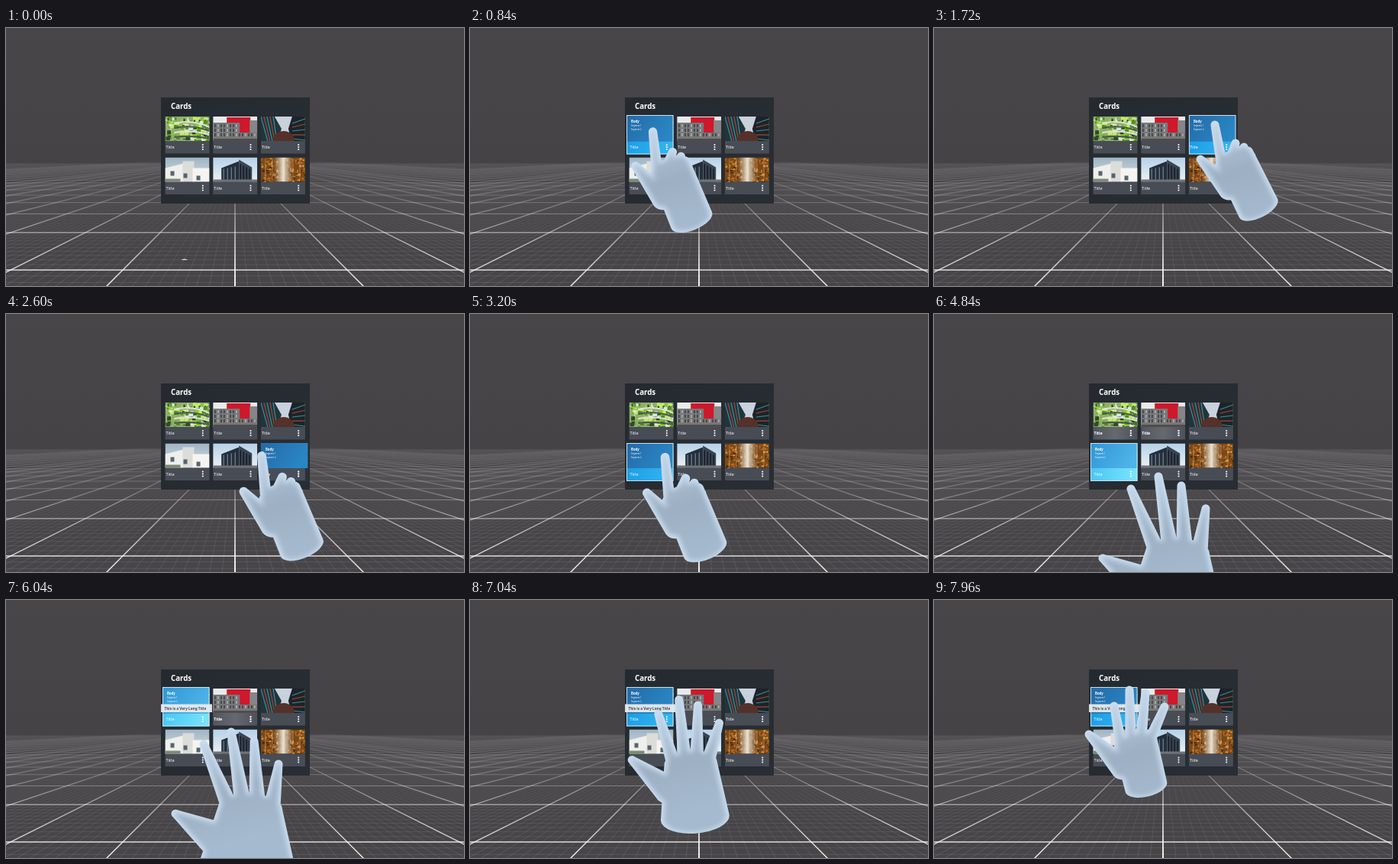
These frames come from a looping animation (600x338 px, 8 s). An HTML page with a canvas:

```html
<!DOCTYPE html>
<html lang="en">
<head>
<meta charset="utf-8">
<title>Cards</title>
<style>
  html, body { margin: 0; width: 100%; height: 100%; overflow: hidden; background: #474547; }
  canvas { display: block; width: 100vw; height: 100vh; }
</style>
</head>
<body>
<canvas id="stage" width="600" height="338"></canvas>
<script>
const W = 600, H = 338, LOOP = 8000;
const FONT = '"Noto Sans", "Open Sans", sans-serif';
const clamp = v => Math.max(0, Math.min(1, v));
const lerp = (a, b, p) => a + (b - a) * p;
const smooth = p => p * p * (3 - 2 * p);

function seeded(seed) {
  return () => (seed = (seed * 16807) % 2147483647) / 2147483647;
}
function box(g, color, x, y, w, h) {
  g.fillStyle = color;
  g.fillRect(x, y, w, h);
}
function poly(g, color, ...p) {
  g.fillStyle = color;
  g.beginPath();
  for (let i = 0; i < p.length; i += 2) g.lineTo(p[i], p[i + 1]);
  g.fill();
}
function line(g, color, width, x1, y1, x2, y2) {
  g.strokeStyle = color;
  g.lineWidth = width;
  g.beginPath();
  g.moveTo(x1, y1);
  g.lineTo(x2, y2);
  g.stroke();
}
function text(g, str, x, y, size, color = '#fff', weight = 400) {
  g.font = `${weight} ${size}px ${FONT}`;
  g.fillStyle = color;
  g.fillText(str, x, y);
}
function ramp(g, x1, y1, x2, y2, ...colors) {
  const r = g.createLinearGradient(x1, y1, x2, y2);
  colors.forEach((c, i) => r.addColorStop(i / (colors.length - 1), c));
  return r;
}
function layer() {
  const canvas = document.createElement('canvas');
  canvas.width = W;
  canvas.height = H;
  return canvas.getContext('2d');
}
// Flecks of random size, cycling through the colours
function flecks(g, seed, count, size, ...colors) {
  const rnd = seeded(seed);
  for (let i = 0; i < count; i++)
    box(g, colors[i % colors.length], rnd() * 58, rnd() * 32, 1 + rnd() * size, 1 + rnd() * size);
}

// ---- Room and floor grid ----
const HORIZON = 170, FADE = 6;
function drawRoom(g) {
  box(g, ramp(g, 0, 0, 0, H, '#484648', '#454345', '#474547'), 0, 0, W, H);
  const white = a => `rgba(255,255,255,${a})`;
  const shade = (...alphas) => ramp(g, 0, HORIZON + FADE, 0, H, ...alphas.map(white));
  const minor = shade(.01, .05, .1, .14), major = shade(.02, .25, .6, .95);
  const visible = i => i % 10 === 0 || Math.abs(i) < 90;
  for (let i = -200; i <= 200; i++) {
    if (!visible(i)) continue;
    const width = i % 10 ? .7 : i ? 1.4 : 2;
    line(g, i % 10 ? minor : major, width, 300 + i / 10 * FADE, HORIZON + FADE, 300 + i * 17, HORIZON + 170);
  }
  for (let i = 18; i < 400; i++) {
    if (!visible(i)) continue;
    const y = HORIZON + 2940 / i;
    line(g, i % 10 ? minor : major, i % 10 ? .7 : lerp(.7, 1.6, (y - HORIZON) / 147), 0, y, W, y);
  }
}

// ---- Card pictures, each 58 by 32 ----
const pictures = [
  g => {
    box(g, '#8fae6e', 0, 0, 58, 32);
    flecks(g, 7, 160, 5, '#8fd02f', '#4f8d25', '#c5ea6a', '#2f4a25', '#dfe6da');
    g.lineWidth = 2;
    for (let k = 0; k < 4; k++) {
      g.strokeStyle = k % 2 ? '#4b5a4a' : '#dfe3dd';
      g.beginPath();
      g.moveTo(12, 9 + k * 6);
      g.quadraticCurveTo(36, 3 + k * 7, 58, 14 + k * 5);
      g.stroke();
    }
  },
  g => {
    box(g, '#e9eaec', 0, 0, 58, 32);
    box(g, '#cf182b', 18, 1, 31, 20);
    box(g, '#77787a', 0, 8, 35, 21);
    box(g, '#858687', 48, 5, 10, 24);
    box(g, '#77787a', 30, 21, 28, 8);
    for (let x = 2; x < 56; x += 4)
      for (let y = 10; y < 28; y += 6)
        if (x < 33 || y > 20) box(g, x % 3 ? '#3a3d40' : '#b0b1b2', x, y, 1.5, 4);
    box(g, '#504c4b', 0, 29, 58, 3);
  },
  g => {
    box(g, '#c9d2dc', 0, 0, 58, 32);
    poly(g, '#22343c', 0, 0, 18, 0, 27, 16, 22, 32, 0, 32);
    poly(g, '#1d2429', 58, 0, 41, 0, 36, 16, 40, 32, 58, 32);
    for (let i = 0; i < 5; i++) {
      const color = i % 2 ? '#a34a30' : '#3f8c99';
      line(g, color, 1.2, i * 4, 0, 9 + i * 3, 32);
      line(g, color, 1.2, 58, 3 + i * 7, 41, 9 + i * 5);
    }
    g.fillStyle = '#55312a';
    g.beginPath();
    g.ellipse(30, 32, 14, 13, 0, 0, 7);
    g.fill();
  },
  g => {
    box(g, ramp(g, 0, 0, 0, 32, '#9fb4c4', '#d9e0e4'), 0, 0, 58, 32);
    poly(g, '#efefed', 0, 14, 24, 8, 24, 32, 0, 32);
    box(g, '#dcdcda', 23, 5, 15, 27);
    box(g, '#f5f4f1', 36, 14, 22, 18);
    for (let i = 0; i < 3; i++) box(g, '#56656a', 7 + i * 17, 18 + i * 3, 5, 6);
    box(g, '#7b8b75', 0, 28, 20, 4);
  },
  g => {
    box(g, ramp(g, 0, 0, 0, 32, '#b5d1e9', '#edf1f3'), 0, 0, 58, 32);
    poly(g, '#252f3b', 11, 14, 34, 5, 34, 32, 11, 32);
    poly(g, '#3a4552', 34, 3, 51, 13, 51, 32, 34, 32);
    for (let i = 0; i < 4; i++) {
      line(g, '#8298ab', 1, 14 + i * 5, 15 - i, 14 + i * 5, 29);
      line(g, '#1b222b', 1.8, 36 + i * 4, 9 + i * 2, 36 + i * 4, 29);
    }
    box(g, '#707376', 0, 29, 58, 3);
  },
  g => {
    box(g, '#7d4817', 0, 0, 58, 32);
    flecks(g, 31, 190, 2.5, '#b96d20', '#4a2a0f', '#d69a45', '#8a4a15');
    box(g, ramp(g, 17, 0, 42, 0, 'rgba(230,220,200,0)', '#e8e2d6', 'rgba(230,220,200,0)'), 17, 0, 25, 32);
    for (let i = 0; i < 6; i++) line(g, '#b59b72', .7, 6 + i * 9, 2, 6 + i * 9, 30);
  }
];

// ---- Panel ----
const cards = pictures.map((picture, i) => {
  const col = i % 3, row = Math.floor(i / 3);
  return { picture, col, row, x: 208.5 + col * 62.7, y: 116 + row * 53.5 };
});
function drawTitle(g, { x, y }) {
  text(g, 'Title', x + 1, y + 42, 5.5);
  for (let k = 0; k < 3; k++) {
    g.beginPath();
    g.arc(x + 49.3, y + 37 + k * 3, 1.05, 0, 7);
    g.fill();
  }
}
function drawPanel(g) {
  box(g, ramp(g, 203, 91, 398, 230, '#242a2f', '#282e33'), 203, 91, 195, 139);
  text(g, 'Cards', 216, 106, 9.7, '#fff', 700);
  for (const card of cards) {
    box(g, '#484c55', card.x, card.y + 32, 58, 16.5);
    g.save();
    g.translate(card.x, card.y);
    g.beginPath();
    g.rect(0, 0, 58, 32);
    g.clip();
    card.picture(g);
    g.restore();
    drawTitle(g, card);
  }
}

// How far a point lies inside a card
const inset = (c, x, y) => Math.min(x - c.x, c.x + 58 - x, y - c.y, c.y + 48.5 - y);

function drawSelected(g, card, depth, bright) {
  const left = card.x - 3.5 + card.col * 1.75, top = card.y - 2 + card.row * 1.5, width = 61.5;
  const split = card.y + 32.5, bottom = card.y + 49.5;
  const sky = bright ? ['#2f96d6', '#4fb4e8'] : ['#236aa8', '#2b86c4'];
  const base = bright ? ['#46c6f5', '#7de6fd'] : ['#1b9ee6', '#35b7f3'];
  box(g, ramp(g, left, top, left + 50, split, ...sky), left, top, width, split - top);
  g.globalAlpha = clamp((depth - 1) / 4);
  box(g, ramp(g, left, split, left + width, bottom, ...base), left, split, width, bottom - split);
  g.strokeStyle = '#c9e2ef';
  g.lineWidth = 1;
  g.strokeRect(left + .5, top + .5, width - 1, bottom - top - 1);
  g.globalAlpha = 1;
  text(g, 'Body', left + 6, top + 10, 4.3, '#fff', 700);
  for (const k of [1, 2]) text(g, `Segment ${k}`, left + 6, top + 10 + k * 5, 2.7);
  drawTitle(g, card);
}
function drawCardStates(g, t, hand) {
  const [x, y] = hand.tip;
  if (t < 3840) {
    const card = cards.find(c => inset(c, x, y) > 0);
    if (card) drawSelected(g, card, inset(card, x, y), false);
    return;
  }
  const pressed = t > 4500 && t < 6700;
  if (pressed)
    for (const card of cards.slice(0, 2)) {
      box(g, ramp(g, card.x, 0, card.x + 58, 0, 'rgba(170,170,170,.1)', 'rgba(170,170,170,.3)', 'rgba(170,170,170,.05)'),
        card.x, card.y + 32, 58, 16.5);
      drawTitle(g, card);
    }
  drawSelected(g, cards[t < 5240 ? 3 : 0], 9, pressed);
  if (t > 5700) {
    box(g, 'rgba(232,236,240,.94)', 203, 136.5, 67, 10.5);
    text(g, 'This is a Very Long Title', 207.5, 143.7, 4.7, '#45484c', 700);
  }
}

// ---- Hand: tapered bones around a palm; positions relative to the index tip ----
const poses = {
  point: { palm: [25, 44, 27], wrist: [57, 109, 28], thumb: [-19, 45], tips: [[0, 0], [27, 24], [38, 29], [48, 41]] },
  near: { palm: [61, 83, 42], wrist: [56, 176, 68], thumb: [-37, 91], tips: [[0, 0], [36, -16], [66, -4], [98, 26]] },
  far: { palm: [28, 49, 29], wrist: [42, 106, 28], thumb: [-33, 37], tips: [[0, 0], [20, -21], [41, -17], [66, 1]] }
};

// Each bone is [x, y, radius, x, y, radius] from root to tip
function skeleton({ palm, wrist, thumb, tips }) {
  const [px, py, pr] = palm, [wx, wy, wr] = wrist;
  const length = Math.hypot(wx - px, wy - py);
  const side = [(wy - py) / length, (px - wx) / length];
  const across = (along, shift) => {
    const r = lerp(pr, wr, along) * shift;
    return [lerp(px, wx, along) + side[0] * r, lerp(py, wy, along) + side[1] * r];
  };
  const fingers = tips.map((tip, i) => [...across(0, -.65 + i * .44), pr * .27, ...tip, 5.5]);
  return [[...wrist, ...palm], [...across(.45, -.85), pr * .55, ...thumb, 5.5], ...fingers];
}

// time, pose, index tip x and y, scale
const track = [
  [0, 'point', 234, 310, 1.35],
  [400, 'point', 236, 240, 1.3],
  [800, 'point', 238, 136, 1.03],
  [1240, 'point', 302, 134, 1],
  [1600, 'point', 378, 114, 1],
  [1720, 'point', 368, 127, 1],
  [2240, 'point', 392, 204, 1.07],
  [2600, 'point', 335, 186, 1.07],
  [2780, 'point', 350, 187, 1.07],
  [3340, 'point', 238, 188, 1.07],
  [3840, 'point', 234, 213, 1.35],
  [4060, 'far', 186, 100, 1],
  [4280, 'near', 240, 258, 1],
  [4840, 'near', 258, 229, 1],
  [6040, 'near', 259, 189, 1],
  [6700, 'near', 256, 185, 1],
  [7320, 'far', 240, 123, 1],
  [7960, 'far', 236, 139, 1]
].map(([at, pose, x, y, scale]) => {
  const turn = scale > 1 ? .07 : 0, c = Math.cos(turn) * scale, s = Math.sin(turn) * scale;
  const place = (px, py, r) => [x + px * c - py * s, y + px * s + py * c, r * scale];
  return { at, tip: [x, y], bones: skeleton(poses[pose]).map(b => [...place(...b.slice(0, 3)), ...place(...b.slice(3))]) };
});

function handAt(t) {
  const next = track.findIndex(k => k.at > t);
  if (next < 0) return track[track.length - 1];
  const a = track[next - 1], b = track[next], p = smooth((t - a.at) / (b.at - a.at));
  const mix = (u, v) => u.map((n, i) => lerp(n, v[i], p));
  return { tip: mix(a.tip, b.tip), bones: a.bones.map((bone, i) => mix(bone, b.bones[i])) };
}
function silhouette(bones, shrink = 0) {
  const path = new Path2D();
  bones.forEach(([x0, y0, r0, x1, y1, r1], i) => {
    const a = Math.atan2(y1 - y0, x1 - x0), q = Math.PI / 2, round = i ? 1 : .45;
    const cap = (x, y, r, from) => path.ellipse(x, y, Math.max(1, r - shrink) * round, Math.max(1, r - shrink), a, from, from + 2 * q);
    const limb = path;
    limb.moveTo(x0 - Math.sin(a) * Math.max(1, r0 - shrink), y0 + Math.cos(a) * Math.max(1, r0 - shrink));
    cap(x0, y0, r0, q);
    cap(x1, y1, r1, -q);
    limb.closePath();
  });
  return path;
}
const handLayer = layer();
function drawHand(g, t, { bones, tip: [x, y] }) {
  const h = handLayer;
  h.clearRect(0, 0, W, H);
  h.fillStyle = '#cbdef1';
  h.fill(silhouette(bones));
  h.save();
  h.globalCompositeOperation = 'source-atop';
  h.filter = 'blur(3px)';
  h.fillStyle = ramp(h, x, y, x + 40, y + 130, '#b3c7da', '#9db0c3', '#a6bacf');
  h.fill(silhouette(bones, 4));
  h.restore();
  g.save();
  // The hand rises out of the floor at first
  g.beginPath();
  g.rect(0, 0, W, t < 240 ? 304 + t * .14 : H);
  g.clip();
  g.drawImage(h.canvas, 0, 0);
  g.restore();
}

// ---- Playback ----
const stage = document.getElementById('stage').getContext('2d');
const scene = layer();
drawRoom(scene);
drawPanel(scene);

let start;
function frame(now) {
  start ??= now;
  const t = (now - start) % LOOP, hand = handAt(t);
  stage.drawImage(scene.canvas, 0, 0);
  drawCardStates(stage, t, hand);
  drawHand(stage, t, hand);
  requestAnimationFrame(frame);
}
requestAnimationFrame(frame);
</script>
</body>
</html>
```
